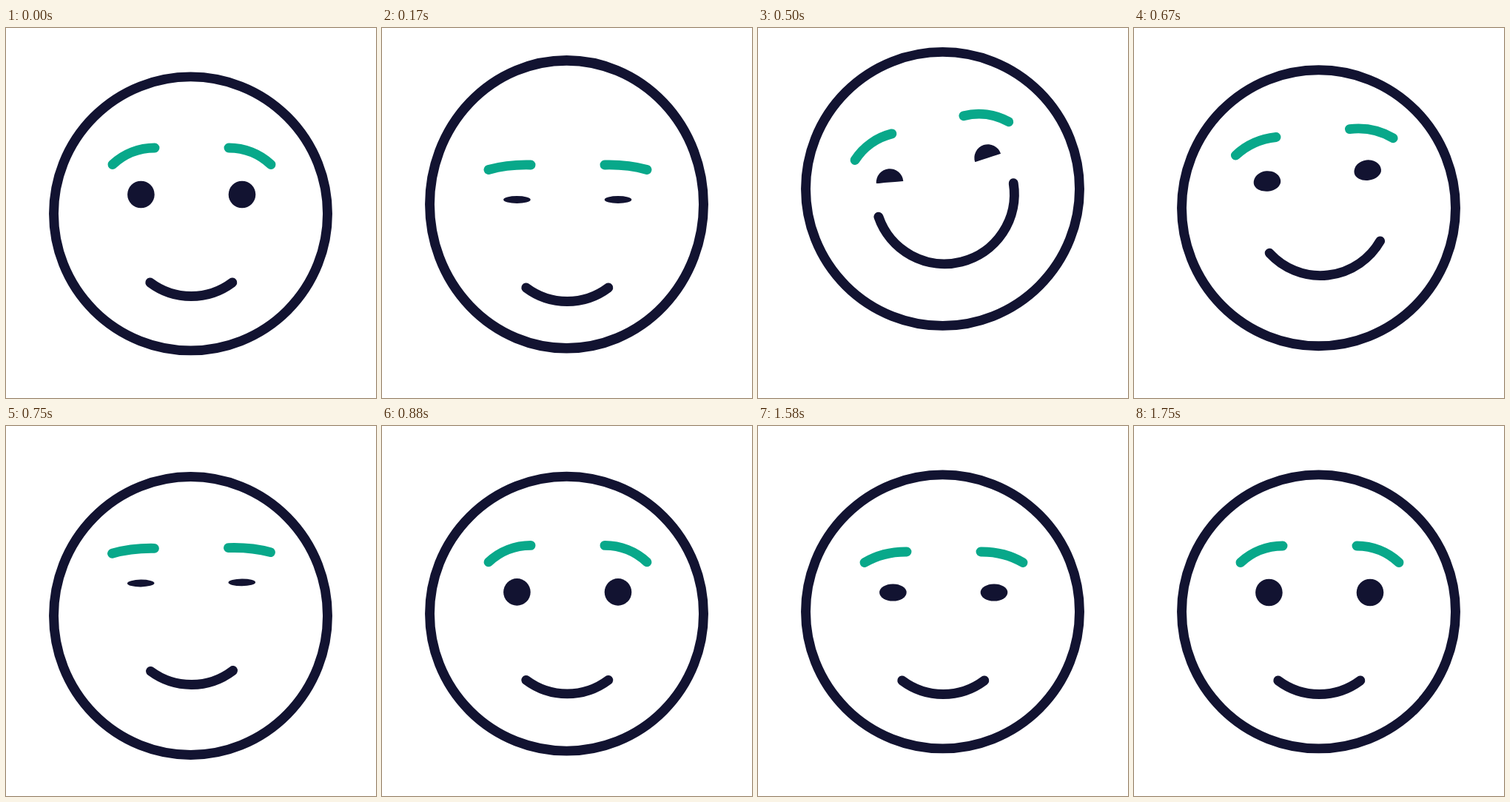
Animation, 500 px wide and 500 px high, one loop 2620 ms. Source, as an HTML page:

```html
<!DOCTYPE html>
<html lang="en">
<head>
<meta charset="utf-8">
<title>Smiling face</title>
<style>
  html, body { margin: 0; width: 100%; height: 100%; overflow: hidden; background: #fff; }
  svg { display: block; width: 100%; height: 100%; }
  .line { fill: none; stroke: #121331; stroke-width: 12.9; stroke-linecap: round; }
  .brow { stroke: #08a88a; }
  .eye { fill: #121331; }
</style>
</head>
<body>
<svg viewBox="0 0 500 500">
  <circle id="head" class="line" r="185"/>
  <g id="face">
    <path id="browL" class="line brow"/>
    <path id="browR" class="line brow" transform="translate(502 0) scale(-1 1)"/>
    <path id="eyeL" class="eye"/>
    <path id="eyeR" class="eye"/>
    <path id="mouth" class="line"/>
  </g>
</svg>
<script>
const LOOP = 2620, TICK = 1000 / 24, RISE = 33.5, FALL = 13;

const $ = id => document.getElementById(id);
const set = (id, name, value) => $(id).setAttribute(name, value);
const mix = (a, b, k) => a + (b - a) * k;
const clamp = x => Math.min(1, Math.max(0, x));

function ease(t, from, to) {
  const u = clamp((t - from) / (to - from));
  return u * u * (3 - 2 * u);
}

// 0 to 1 on the way up, back to 0 once the fall begins
const swing = (t, from, to, end) => ease(t, from, to) - ease(t, FALL, end);

// Soft pulse, 1 at its centre
const bump = (t, centre, width) => Math.cos(clamp(Math.abs(t - centre) / width) * Math.PI / 2) ** 2;

const shut = (t, centre) => clamp(1.25 - Math.abs(t - centre) / 2);

function drawHead(t) {
  const y = 250.9 - RISE * swing(t, 1, 8.2, 18) + 8 * bump(t, 2, 2) + 5.6 * bump(t, 18, 6);
  const stretch = 1 + 0.051 * bump(t, 4, 3) + 0.016 * bump(t, 18, 4);
  set('head', 'transform', `translate(249.5 ${y}) scale(1 ${stretch})`);
}

function drawBrows(blink) {
  const outer = `${mix(159.4, 162, blink)} ${mix(170, 179.5, blink)}`;
  const inner = `${mix(180, 182, blink)} ${mix(162, 177.5, blink)}`;
  const d = `M144 184.5C${outer} ${inner} 201 ${mix(162, 178, blink)}`;
  set('browL', 'd', d);
  set('browR', 'd', d);
}

function drawEye(id, x, angle, blink, squint) {
  const r = 18.3, up = mix(r, 4.9, blink), low = Math.max(0.01, up * (1 - squint));
  set(id, 'd', `M${-r} 0A${r} ${up} 0 0 1 ${r} 0A${r} ${low} 0 0 1 ${-r} 0Z`);
  set(id, 'transform', `translate(${x} 225) rotate(${angle * squint})`);
}

function drawMouth(smile) {
  const r = mix(92.5, 94.3, smile), half = mix(36.9, 85, smile) * Math.PI / 180;
  const dx = r * Math.sin(half), y = mix(270, 258.4, smile) + r * Math.cos(half);
  set('mouth', 'd', `M${250.3 - dx} ${y}A${r} ${r} 0 0 0 ${250.3 + dx} ${y}`);
}

function draw(t) {
  const blink = Math.max(shut(t, 4), shut(t, 18), shut(t, 39.5));
  const squint = swing(t, 5, 7, 17);
  const lift = 7 * bump(t, 4, 4) - RISE * swing(t, 4, 10, 21.7);
  const tilt = -14 * swing(t, 4, 11, 18.6);

  drawHead(t);
  set('face', 'transform', `translate(0 ${lift}) rotate(${tilt} 249.5 251)`);
  drawBrows(blink);
  drawEye('eyeL', 182.4, 9, blink, squint);
  drawEye('eyeR', 319, -4, blink, squint);
  drawMouth(swing(t, 4, 10.5, 18));
}

const start = performance.now();
function frame() {
  const t = (performance.now() - start) % LOOP;
  draw(Math.floor((t + 4) / TICK));
  requestAnimationFrame(frame);
}
frame();
</script>
</body>
</html>
```
